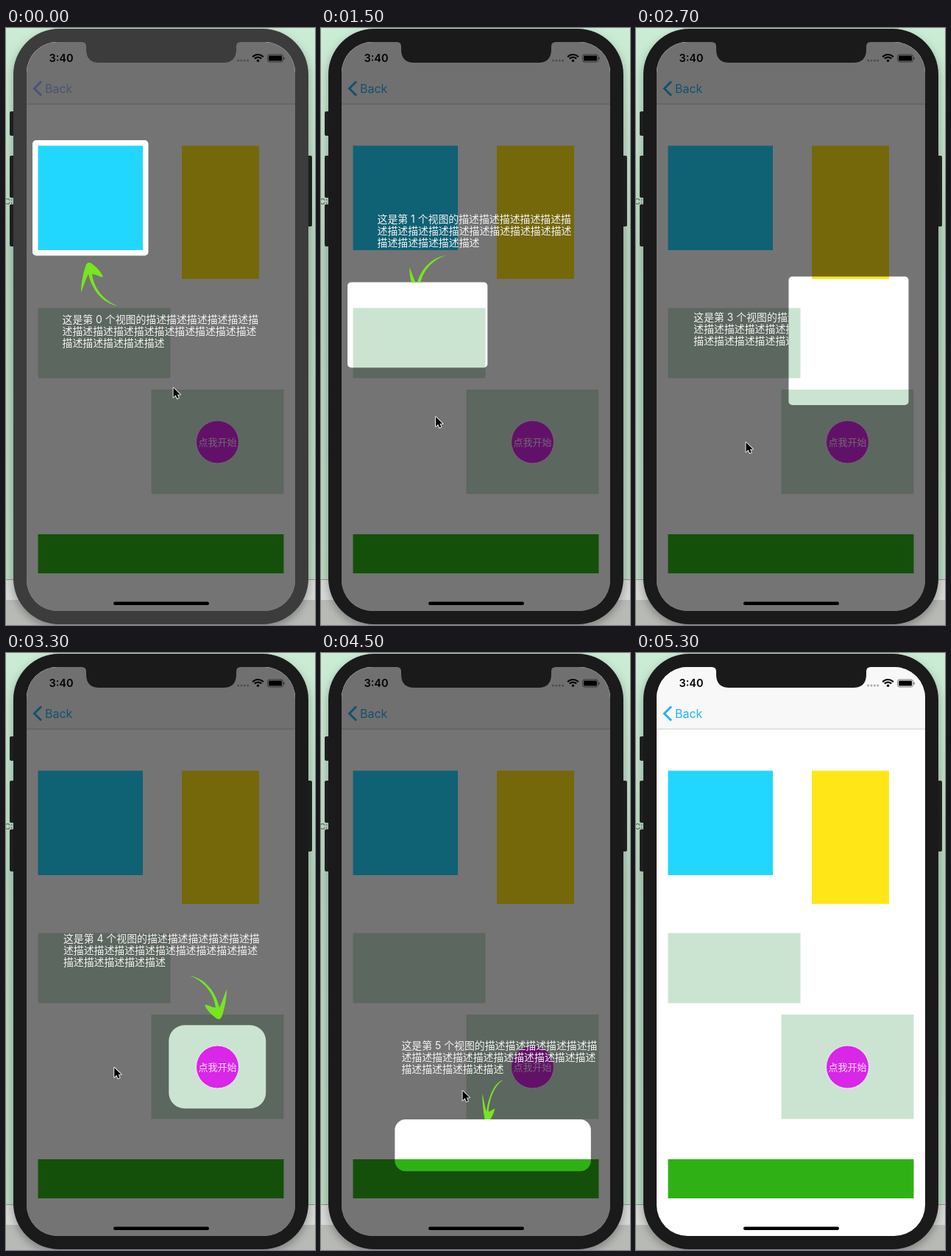
These frames come from a looping animation (420 px wide and 809 px high, 5400 ms). An HTML page with a canvas:

```html
<!DOCTYPE html>
<html lang="zh">
<head>
<meta charset="utf-8">
<style>
html, body { margin: 0; width: 100%; height: 100%; overflow: hidden; background: #c6e6cf; }
canvas { display: block; }
</style>
</head>
<body>
<canvas id="stage" width="420" height="809"></canvas>
<script>
const ctx = document.getElementById('stage').getContext('2d');
const LOOP = 5400, MOVE = 400, FADE_START = 4844, FADE = 400;
const FONT = 'Inter, "Noto Sans CJK SC", "Noto Sans CJK", sans-serif';
const ARROW = new Path2D('M25 29 C5 26 -10 8 -15 -14 C-18.5 -8 -21.5 3 -25 11 C-25 -4 -21 -19 -18 -27 ' +
  'Q-15 -32 -10 -28 C-5 -24 3 -17 5 -10 C0 -10 -5 -14 -10 -14 C-8 4 5 22 25 29Z');
const POINTER = new Path2D('M0 0 V15 L3.6 11.7 L6 17 L8.6 15.8 L6.3 10.7 H11Z');

// hole: x, y, w, h, radius; arrow: x, y, scaleX, scaleY; text: x, y of the first line
const cyan = { hole: [36, 152, 157.5, 156.5, 5], arrow: [127, 347.5, 1, 1], text: [77, 395] };
const mint = { hole: [36, 372, 195, 110, 5], arrow: [146, 334, 1, -1], text: [77, 252.5] };
const yellow = { hole: [231, 152, 121, 196, 5], arrow: [304, 386, 1, 1], text: [77, 434] };
const panel = { hole: [189, 482, 196, 157, 5], arrow: [275, 444, -1, -1], text: [80, 362] };
const disc = { hole: [250.5, 524.5, 74, 73, 36.5], arrow: [275, 486, -1, -1], text: [77, 408] };
const bar = { hole: [36, 678, 349, 69, 5], arrow: [222, 641, 1, -1], text: [119, 566] };
const steps = [cyan, mint, yellow, panel, disc, bar, disc];
const starts = [-MOVE, 1150, 1942, 2476, 3090, 3704, 4380];
const pointerKeys = [[0, 227, 487], [600, 227, 487], [1000, 157, 516], [1200, 157, 516], [2000, 153, 544],
  [2700, 149, 561], [4000, 144, 562], [4400, 144, 562], [4900, 384, 716], [5100, 430, 730], [5400, 430, 730]];

const clamp = v => Math.min(1, Math.max(0, v));
const ease = p => p * p * (3 - 2 * p);
const mix = (a, b, p) => a.map((v, i) => v + (b[i] - v) * p);

function rect(color, x, y, w, h, r = 0) {
  ctx.fillStyle = color;
  ctx.beginPath();
  ctx.roundRect(x, y, w, h, r);
  ctx.fill();
}

function circle(x, y, r, fill, stroke, width) {
  ctx.beginPath();
  ctx.arc(x, y, r, 0, 7);
  if (fill) { ctx.fillStyle = fill; ctx.fill(); }
  if (stroke) { ctx.strokeStyle = stroke; ctx.lineWidth = width; ctx.stroke(); }
}

function label(str, x, y, size, color, weight = 400, align = 'left') {
  ctx.font = `${weight} ${size}px ${FONT}`;
  ctx.textAlign = align;
  ctx.textBaseline = 'alphabetic';
  ctx.fillStyle = color;
  ctx.fillText(str, x, y);
}

function drawDesk() {
  const g = ctx.createLinearGradient(0, 0, 0, 748);
  g.addColorStop(0, '#cbecd5');
  g.addColorStop(0.15, '#c3e3cc');
  g.addColorStop(0.4, '#b4d3bd');
  g.addColorStop(1, '#b8d7c0');
  rect(g, 0, 0, 420, 748);
  rect('#d6d9d6', 0, 748, 420, 27);
  rect('#8f918e', 0, 747, 420, 1);
  rect('#b8bab6', 0, 775, 420, 34);
  label('C:', -2, 239, 11, '#4d5a52');
}

function drawPhone(bezel) {
  for (const [x, y, h] of [[5, 113, 33], [5, 173, 57], [5, 239, 57], [408, 173, 96]])
    rect('#222', x, y, 8, h, 2);
  ctx.save();
  ctx.shadowColor = 'rgba(0,0,0,.3)';
  ctx.shadowBlur = 12;
  ctx.shadowOffsetY = 5;
  rect(bezel, 10, 1, 401, 807, 62);
  ctx.restore();
}

function drawStatus() {
  label('3:40', 58.5, 46, 14.5, '#000', 600);
  for (let i = 0; i < 4; i++) circle(315.5 + i * 4.4, 44, 1.5, '#aaa');
  ctx.strokeStyle = '#000';
  ctx.lineWidth = 2.2;
  for (const r of [10, 6.4]) {
    ctx.beginPath();
    ctx.arc(342.5, 46, r, -Math.PI * 0.76, -Math.PI * 0.24);
    ctx.stroke();
  }
  circle(342.5, 44.3, 1.8, '#000');
  ctx.strokeStyle = '#777';
  ctx.lineWidth = 1;
  ctx.beginPath();
  ctx.roundRect(355.5, 36, 21, 10, 2.5);
  ctx.stroke();
  rect('#000', 357, 37.5, 18, 7, 1.2);
  rect('#777', 377.5, 39.5, 1.3, 3.5, 1);
}

function drawApp(tint) {
  rect('#fff', 28, 19, 365, 771);
  rect('#f8f8f8', 28, 19, 365, 84);
  rect('#c9c9c9', 28, 102.5, 365, 1);
  drawStatus();
  ctx.strokeStyle = tint;
  ctx.lineWidth = 3;
  ctx.stroke(new Path2D('M48 72.5 L38.5 82 L48 91.5'));
  label('Back', 53, 87.7, 16, tint);
  rect('#22d7ff', 43.5, 159.5, 142.5, 141.5);
  rect('#ffe617', 239, 159.5, 105, 180.5);
  rect('#cbe4d2', 43.5, 379.5, 180, 95);
  rect('#cbe4d2', 197.5, 490, 180, 141.5);
  circle(287.5, 561, 29, '#d926e8', '#f3e2f5', 1);
  label('点我开始', 287.5, 565.5, 13, '#f6e4f8', 400, 'center');
  rect('#2fb116', 43.5, 686, 334, 53);
  rect('#000', 146, 777.5, 130, 4.5, 2.2);
}

function drawGuide(t) {
  const i = starts.findLastIndex(s => s <= t);
  const p = clamp((t - starts[i]) / MOVE);
  const from = steps[Math.max(0, i - 1)], to = steps[i];
  const between = (key, q) => mix(from[key], to[key], q);
  const out = clamp((t - FADE_START) / FADE);
  if (out === 1) return;

  ctx.save();
  ctx.globalAlpha = 1 - out;
  const [hx, hy, hw, hh, hr] = between('hole', p);
  ctx.beginPath();
  ctx.rect(28, 19, 365, 771);
  ctx.roundRect(hx, hy, hw, hh, hr);
  ctx.clip('evenodd');
  rect('rgba(0,0,0,.545)', 28, 19, 365, 771);

  // hint shrinks towards the lower right corner while fading
  ctx.translate(364, 720);
  ctx.scale(1 - out, 1 - out);
  ctx.translate(-364, -720);
  const [tx, ty] = between('text', ease(p));
  const lines = [`这是第 ${Math.min(i, 5)} 个视图的${'描述'.repeat(5)}描`, '述' + '描述'.repeat(9), '描述'.repeat(5)];
  lines.forEach((line, n) => label(line, tx - 0.5, ty + 5 + n * 16, 13.9, '#f4f4f4'));
  const [ax, ay, sx, sy] = between('arrow', ease(p));
  ctx.translate(ax, ay);
  ctx.scale(sx, sy);
  ctx.fillStyle = '#76e61f';
  ctx.fill(ARROW);
  ctx.restore();
}

function drawNotch(bezel) {
  ctx.fillStyle = bezel;
  ctx.fill(new Path2D('M103 18 V19 Q109 19 109 25 V29 Q109 47 127 47 H295 Q313 47 313 29 V25 Q313 19 319 19 V18Z'));
}

function drawPointer(t) {
  const k = Math.max(1, pointerKeys.findIndex(key => key[0] > t));
  const a = pointerKeys[k - 1], b = pointerKeys[k];
  const [, x, y] = mix(a, b, (t - a[0]) / (b[0] - a[0]));
  if (starts.some(s => s > t && s - t <= 100)) {
    circle(x + 0.5, y + 1.5, 19, null, '#fff', 5);
    circle(x + 0.5, y + 1.5, 19, null, '#000', 3);
  }
  ctx.save();
  ctx.translate(x + 0.5, y + 0.5);
  ctx.scale(0.86, 0.86);
  ctx.lineJoin = 'round';
  ctx.lineWidth = 2;
  ctx.strokeStyle = '#fff';
  ctx.stroke(POINTER);
  ctx.fillStyle = '#000';
  ctx.fill(POINTER);
  ctx.restore();
}

function draw(t) {
  const early = t < 1200;
  const bezel = early ? '#3c3c3c' : '#1a1a1b';
  ctx.clearRect(0, 0, 420, 809);
  drawDesk();
  drawPhone(bezel);
  ctx.save();
  ctx.beginPath();
  ctx.roundRect(28, 19, 365, 771, 42);
  ctx.clip();
  drawApp(early ? '#a0b8ff' : '#22b4f4');
  drawGuide(t);
  drawNotch(bezel);
  ctx.restore();
  drawPointer(t);
}

const begin = performance.now();
function tick() {
  const t = (performance.now() - begin) % LOOP;
  draw(t < 600 ? 0 : Math.floor(t / 100) * 100);
  requestAnimationFrame(tick);
}
tick();
</script>
</body>
</html>
```
